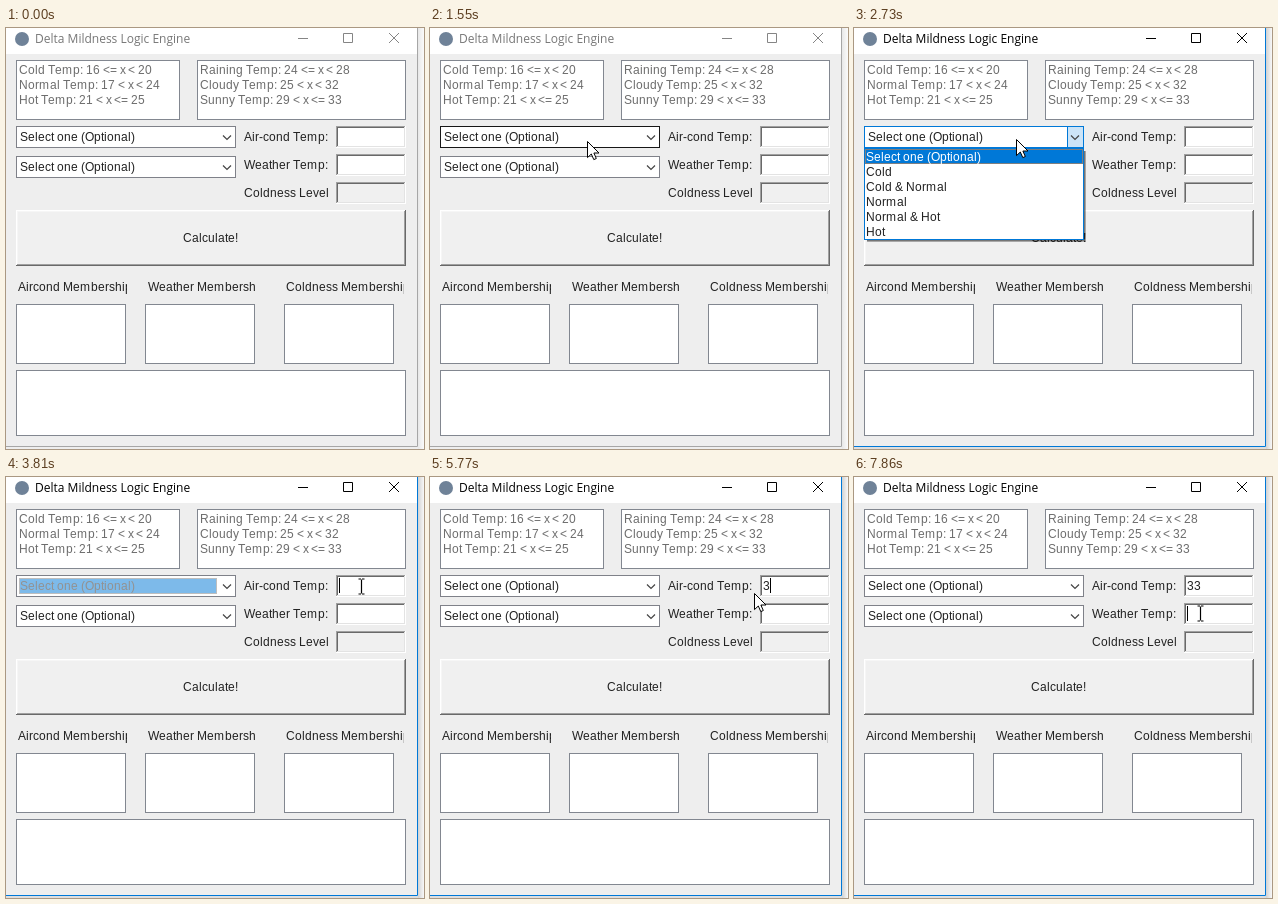
Recreate the animation shown at these times as an HTML page. Size 418 px wide and 421 px high, loop 8000 ms.

```html
<!DOCTYPE html>
<html lang="en">
<head>
<meta charset="utf-8">
<title>Fuzzy temperature form</title>
<style>
html, body { margin: 0; width: 100%; height: 100%; overflow: hidden; background: #fff; }
svg { display: block; }
text { font: 12px "Liberation Sans", Arial, sans-serif; white-space: pre; }
text.title { font-family: "Open Sans", "Noto Sans", sans-serif; }
</style>
</head>
<body>
<svg id="stage" width="418" height="421" viewBox="0 0 418 421">
  <defs>
    <linearGradient id="shade">
      <stop offset="0" stop-color="#d2d2d2"/>
      <stop offset="1" stop-color="#f8f8f8"/>
    </linearGradient>
  </defs>
</svg>
<script>
const LOOP = 8000, BLINK = 525;
const LINE = 15, FIELD_STEP = 28, FIELD_X = 330, FIELD_Y = 98;
const BLUE = '#0078d7', INK = '#222', DIM = '#6d6d6d', EDGE = '#828790';
const PANEL = '#eeeeee', FACE = '#f0f0f0';
const PROMPT = 'Select one (Optional)';
const stage = document.getElementById('stage');
const pen = document.createElement('canvas').getContext('2d');
pen.font = '12px "Liberation Sans", Arial, sans-serif';

function add(parent, tag, attrs) {
  const el = document.createElementNS('http://www.w3.org/2000/svg', tag);
  for (const key in attrs) el.setAttribute(key, attrs[key]);
  return parent.appendChild(el);
}

const group = parent => add(parent, 'g', {});
const path = (parent, d, attrs) => add(parent, 'path', { d, fill: 'none', ...attrs });

function rect(parent, x, y, width, height, fill) {
  return add(parent, 'rect', { x, y, width, height, fill, 'shape-rendering': 'crispEdges' });
}

function box(parent, x, y, w, h, stroke = EDGE, fill = '#fff') {
  return add(parent, 'rect', { x: x + .5, y: y + .5, width: w - 1, height: h - 1, fill, stroke });
}

// Glyph advances are whole pixels; hinting moves two letters off plain rounding.
const hinted = { m: 11, x: 5 };
const advance = ch => hinted[ch] || Math.round(pen.measureText(ch).width);

function label(parent, x, y, str, fill = INK) {
  let at = x;
  const xs = [...str].map(ch => (at += advance(ch)) - advance(ch));
  const el = add(parent, 'text', { x: xs.join(' '), y, fill });
  el.textContent = str;
  return el;
}

const lines = (parent, x, y, strings, step = LINE, fill = INK) =>
  strings.map((s, i) => label(parent, x, y + step * i, s, fill));

function clipped(x, y, str, right) {
  const id = 'clip' + x;
  rect(add(stage, 'clipPath', { id }), x, y - 14, right - x, 20);
  label(stage, x, y, str).setAttribute('clip-path', `url(#${id})`);
}

// Two-pixel bevel: outer and inner shades for the lit and the far sides.
function bevel(x, y, w, h, fill, near, far) {
  [0, 1].forEach(i => {
    rect(stage, x + i, y + i, w - 2 * i, h - 2 * i, far[i]);
    rect(stage, x + i, y + i, w - 2 * i - 1, h - 2 * i - 1, near[i]);
  });
  rect(stage, x + 2, y + 2, w - 4, h - 4, fill);
}

function dotted(parent, x, y, w, h) {
  const frame = box(parent, x, y, w, h, '#ff8728', 'none');
  frame.setAttribute('stroke-dasharray', '1 1');
}

function combo(y) {
  const frame = box(stage, 10, y, 220, 22);
  const button = box(stage, 213, y, 17, 22, BLUE, '#cce4f7');
  path(stage, `M217 ${y + 9.5}l4 4l4 -4`, { stroke: '#444', 'stroke-width': 1.2 });
  label(stage, 14, y + 15, PROMPT);
  return { y, frame, button };
}

// Window chrome
rect(stage, 0, 0, 418, 421, '#fff');
const shadow = group(stage);
rect(shadow, 412, 0, 6, 421, 'url(#shade)');
rect(shadow, 0, 419, 412, 2, '#dedede');
rect(stage, 0, 26, 411, 392, PANEL);
const border = path(stage, 'M411.5 0V418.5H0', {});
add(stage, 'circle', { cx: 16, cy: 11, r: 7, fill: '#6f8298' });
const title = add(stage, 'text', { x: 29, y: 15, class: 'title' });
title.textContent = 'Delta Mildness Logic Engine';
const controls = path(stage, 'M292 10.5h10M337.5 5.5h9v9h-9zM383 5l10 10M393 5l-10 10', {});

// Form
box(stage, 10, 32, 164, 60);
box(stage, 191, 32, 209, 60);
lines(stage, 13, 46, ['Cold Temp: 16 <= x < 20', 'Normal Temp: 17 < x < 24',
  'Hot Temp: 21 < x <= 25'], LINE, DIM);
lines(stage, 194, 46, ['Raining Temp: 24 <= x < 28', 'Cloudy Temp: 25 < x < 32',
  'Sunny Temp: 29 < x <= 33'], LINE, DIM);

const combos = [98, 128].map(combo);
const focus = group(stage);
rect(focus, 13, 101, 198, 16, BLUE);
dotted(focus, 13, 101, 198, 16);
label(focus, 14, 113, PROMPT, '#fff');

lines(stage, 238, 113, ['Air-cond Temp:', 'Weather Temp:', 'Coldness Level'], FIELD_STEP);
['#fff', '#fff', FACE].forEach((fill, i) =>
  bevel(FIELD_X, FIELD_Y + FIELD_STEP * i, 70, 22, fill, ['#a0a0a0', '#696969'], ['#fff', '#e3e3e3']));
const digits = [0, 1].map(i => label(stage, FIELD_X + 3 + advance('3') * i, 113, '3'));
const caret = rect(stage, 0, 0, 1, 15, '#000');

bevel(10, 182, 390, 56, FACE, ['#fff', '#f6f6f6'], ['#696969', '#a0a0a0']);
label(stage, 177, 214, 'Calculate!');
clipped(12, 263, 'Aircond Membership', 121);
clipped(142, 263, 'Weather Membership', 250);
clipped(280, 263, 'Coldness Membership', 398);
[10, 139, 278].forEach(x => box(stage, x, 276, 110, 60));
box(stage, 10, 342, 390, 66);

// Drop-down list
const popup = group(stage);
[2, 1].forEach(d => add(popup, 'rect',
  { x: 13, y: 123, width: 217 + d, height: 89 + d, fill: '#000', opacity: .3 }));
box(popup, 10, 120, 220, 92, BLUE);
const marker = group(popup);
rect(marker, 11, 121, 218, LINE, BLUE);
dotted(marker, 11, 121, 218, LINE);
const items = lines(popup, 12, 133,
  [PROMPT, 'Cold', 'Cold & Normal', 'Normal', 'Normal & Hot', 'Hot']);

// Pointers
const arrow = path(stage, 'M.5 .5V16.6L4.3 13L6.8 18.6L9.3 17.5L6.9 12H12z',
  { fill: '#fff', stroke: '#000' });
const beam = path(stage, 'M-3 -7.5h2.5M.5 -7.5h2.5M0 -7V7M-3 7.5h2.5M.5 7.5h2.5',
  { stroke: '#000', 'stroke-width': 1.2 });

// Each move glides to (x, y); a bend swings it out on the way.
const move = (from, to, x, y, bendX = 0, bendY = 0) => ({ from, to, x, y, bendX, bendY });
const entry = { x: 270, y: 357 };
const moves = [
  move(70, 700, 200, 131),
  move(1080, 1550, 157, 113),
  move(1620, 2090, 180, 110, 50),
  move(2180, 2730, 162, 111, 0, 40),
  move(3260, 3650, 355, 109),
  move(4360, 4450, 342, 116),
  move(5690, 5770, 324, 116),
  move(5940, 6170, 348, 139),
  move(7010, 7780, 346, 136, -124, 94)
];

const clamp = k => Math.min(1, Math.max(0, k));
const ease = k => k * k * (3 - 2 * k);

function pointerAt(t) {
  let { x, y } = entry;
  for (const m of moves) {
    const k = ease(clamp((t - m.from) / (m.to - m.from)));
    const swing = Math.sin(Math.PI * k);
    x += (m.x - x) * k + m.bendX * swing;
    y += (m.y - y) * k + m.bendY * swing;
  }
  return [Math.round(x), Math.round(y)];
}

// Clicks and key presses restart the caret's blink.
const inputs = [
  { at: 3790, field: 0, length: 0 },
  { at: 5530, field: 0, length: 1 },
  { at: 6400, field: 0, length: 2 },
  { at: 7830, field: 1, length: 0 }
];

const during = (t, from, to) => t >= from && t < to;
const show = (el, on) => el.setAttribute('visibility', on ? 'visible' : 'hidden');
const paint = (el, attr, value) => el.setAttribute(attr, value);

function drawWindow(active) {
  paint(border, 'stroke', active ? BLUE : '#a6a6a6');
  paint(title, 'fill', active ? '#000' : '#777');
  paint(controls, 'stroke', active ? '#000' : '#858585');
  paint(shadow, 'opacity', active ? 1 : .5);
}

function drawCombos(t, x, y) {
  const open = during(t, 2010, 3340);
  combos.forEach((c, i) => {
    const pressed = open && i === 0;
    const hover = t >= 70 && during(x, 10, 230) && during(y, c.y, c.y + 22);
    paint(c.frame, 'stroke', pressed ? BLUE : hover ? '#171717' : '#7f8189');
    show(c.button, pressed);
  });
  show(popup, open);
  const row = Math.max(0, Math.floor((y - 121) / LINE));
  paint(marker, 'transform', `translate(0 ${LINE * row})`);
  items.forEach((el, i) => paint(el, 'fill', i === row ? '#fff' : INK));
  show(focus, during(t, 3340, 4130));
  paint(focus, 'opacity', (1 - clamp((t - 3730) / 400)) ** 3);
}

function drawInput(t) {
  const last = inputs.filter(e => e.at <= t).pop();
  digits.forEach((el, i) => show(el, inputs.some(e => e.at <= t && e.length > i)));
  show(caret, last && (t - last.at) % (2 * BLINK) < BLINK);
  if (!last) return;
  paint(caret, 'x', FIELD_X + 3 + advance('3') * last.length);
  paint(caret, 'y', FIELD_Y + 3 + FIELD_STEP * last.field);
}

function drawPointer(t, x, y) {
  const seen = t >= 70 && !during(t, 5530, 5700);
  const row = (y - FIELD_Y) / FIELD_STEP;
  const inField = during(x, FIELD_X, 400) && during(row, 0, 3) && row % 1 < 22 / FIELD_STEP;
  show(arrow, seen && !inField);
  show(beam, seen && inField);
  paint(arrow, 'transform', `translate(${x} ${y})`);
  paint(beam, 'transform', `translate(${x + .5} ${y + .5})`);
}

function draw(t) {
  const [x, y] = pointerAt(t);
  drawWindow(t >= 1940);
  drawCombos(t, x, y);
  drawInput(t);
  drawPointer(t, x, y);
}

const start = performance.now();
function tick() {
  draw((performance.now() - start) % LOOP);
  requestAnimationFrame(tick);
}
tick();
</script>
</body>
</html>
```
